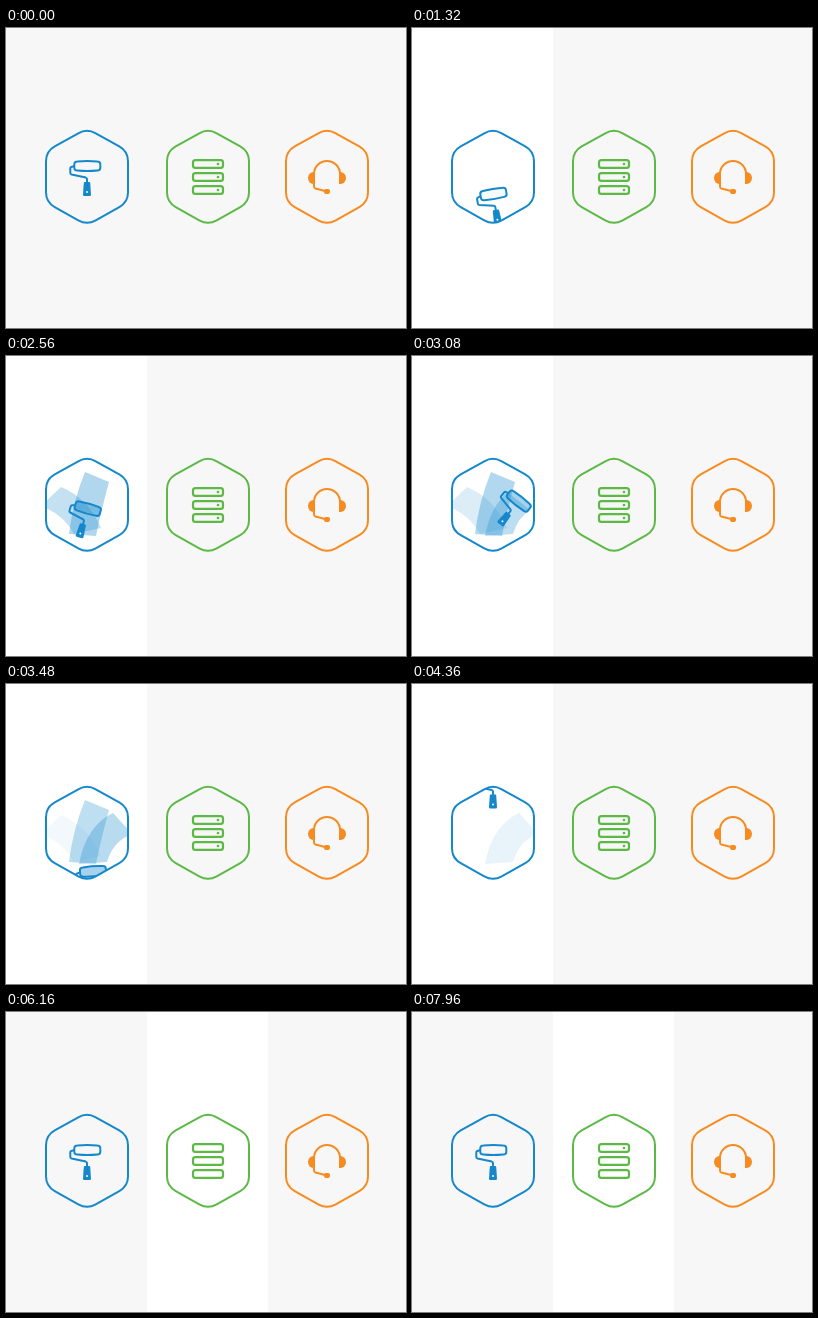
Recreate the animation shown at these times as an HTML page. Size 400x300 px, loop 8000 ms.

```html
<!DOCTYPE html>
<html lang="en">
<head>
<meta charset="utf-8">
<title>Service icons</title>
<style>
html, body { margin: 0; width: 100%; height: 100%; overflow: hidden; background: #f7f7f7; }
svg { display: block; width: 100vw; height: 100vh; }
</style>
</head>
<body>
<svg viewBox="0 0 400 300" fill="none" stroke-width="2" stroke-linejoin="round" stroke-linecap="round">
  <defs>
    <path id="hex"/>
    <clipPath id="inside"><use href="#hex" x="81" y="148.8"/></clipPath>
  </defs>
  <rect id="col1" width="141" height="300" fill="#fff"/>
  <rect id="col2" x="141" width="121" height="300" fill="#fff"/>

  <g stroke="#1588cb">
    <g clip-path="url(#inside)">
      <g id="paints" fill="#1588cb" stroke="none"></g>
      <g id="roller">
        <path id="body" fill="#1588cb" d="M-10 -4.6Q0 -5.6 10 -4.6Q13 -4.4 13 -2V2Q13 4.4 10 4.6Q0 5.6 -10 4.6Q-13 4.4 -13 2V-2Q-13 -4.4 -10 -4.6Z"/>
        <path d="M-13.5 0.2L-16 1Q-17 1.3 -17 2.5V7Q-17 8.2 -15.8 8.5L-1.5 11.6Q-0.3 12 -0.3 13V16"/>
        <path fill="#1588cb" stroke="none" d="M-2.6 16H2Q2.8 16 2.9 17L3.7 28.4Q3.8 30 2.4 30H-3Q-4.4 30 -4.3 28.4L-3.5 17Q-3.4 16 -2.6 16Z"/>
        <circle cx="-0.3" cy="26" r="1" fill="#fff" stroke="none"/>
      </g>
    </g>
    <use href="#hex" x="81" y="148.8"/>
  </g>

  <g stroke="#5cb946">
    <use href="#hex" x="202" y="148.8"/>
    <g id="bars" stroke-width="2.2"></g>
    <g id="lights" fill="#5cb946" stroke="none"></g>
  </g>

  <g stroke="#f68b1f">
    <use href="#hex" x="321" y="148.8"/>
    <path d="M308 156V146A13 13 0 0 1 334 146V150M308 155V158.5Q308 160 309.5 160.5L319 163"/>
    <g fill="#f68b1f" stroke="none">
      <path d="M309 144V156H307.5A5.5 6 0 0 1 307.5 144Z"/>
      <path d="M333 144V156H334.5A5.5 6 0 0 0 334.5 144Z"/>
      <rect x="318" y="161" width="6" height="5" rx="2"/>
    </g>
  </g>
</svg>
<script>
const LOOP = 8000, HOVER1 = 1160, HOVER2 = 5720;
const el = id => document.getElementById(id);
const clamp = x => Math.max(0, Math.min(1, x));
const smooth = x => (1 - Math.cos(Math.PI * clamp(x))) / 2;
const linear = x => clamp(x);
const mix = (a, b, u) => a + (b - a) * u;
const mixPt = (p, q, u) => [mix(p[0], q[0], u), mix(p[1], q[1], u)];

function add(parent, tag, attrs = {}) {
  const node = document.createElementNS('http://www.w3.org/2000/svg', tag);
  for (const k in attrs) node.setAttribute(k, attrs[k]);
  return el(parent).appendChild(node);
}

// keys: [time, value] pairs
function track(keys, t, ease = linear) {
  if (t <= keys[0][0]) return keys[0][1];
  for (let i = 1; i < keys.length; i++) {
    const [a, from] = keys[i - 1], [b, to] = keys[i];
    if (t < b) return mix(from, to, ease((t - a) / (b - a)));
  }
  return keys[keys.length - 1][1];
}

function hexPath() {
  const pts = [[0, -48.4], [41, -25.5], [41, 25.5], [0, 48.4], [-41, 25.5], [-41, -25.5]];
  const toward = (p, q) => mixPt(p, q, 10 / Math.hypot(q[0] - p[0], q[1] - p[1]));
  return pts.map((p, i) => {
    const start = toward(p, pts[(i + 5) % 6]), end = toward(p, pts[(i + 1) % 6]);
    return `${i ? 'L' : 'M'}${start}Q${p} ${end}`;
  }).join('') + 'Z';
}
el('hex').setAttribute('d', hexPath());

// Each stroke sweeps an edge between two curved sides: out, then back.
const strokes = [
  { left: [[68, 178], [57, 158], [35, 150]], right: [[95, 172], [82, 142], [55, 131]],
    start: 1400, top: 1700, end: 2040,
    fade: [[1400, .14], [1840, .18], [2300, .28], [2560, .25], [3080, .15], [3700, 0]] },
  { left: [[63, 178], [67, 145], [79, 116]], right: [[90, 180], [95, 155], [103, 126]],
    start: 2040, top: 2360, end: 2740,
    fade: [[2040, .2], [2480, .34], [3100, .33], [3640, .25], [4280, 0]] },
  { left: [[73, 180], [80, 142], [107, 129]], right: [[101, 178], [107, 157], [126, 150]],
    start: 2740, top: 3240, end: 3460,
    fade: [[2740, .2], [3080, .28], [3560, .3], [4360, .1], [4600, 0]] }
];
for (const s of strokes) s.path = add('paints', 'path');

function split([p, c, q], u) {
  const ctrl = mixPt(p, c, u);
  return [p, ctrl, mixPt(ctrl, mixPt(c, q, u), u)];
}

function paintPath(s, u) {
  const l = split(s.left, u), r = split(s.right, u);
  return `M${l[0]}Q${l[1]} ${l[2]}L${r[2]}Q${r[1]} ${r[0]}Z`;
}

function edgePose(s, u) {
  const a = split(s.left, u)[2], b = split(s.right, u)[2];
  const [x, y] = mixPt(a, b, .5);
  return [x, y, Math.atan2(b[1] - a[1], b[0] - a[0]) * 180 / Math.PI];
}

const HOME = [81.3, 138, 0];
const mixPose = (p, q, u) => p.map((v, i) => mix(v, q[i], u));

function rollerPose(t) {
  if (t < HOVER1 || t >= 5040) return HOME;
  if (t < 1400) return mixPose(HOME, edgePose(strokes[0], 0), smooth((t - HOVER1) / 240));
  for (let i = 0; i < 3; i++) {
    const s = strokes[i];
    if (t >= s.end) continue;
    const u = track([[s.start, 0], [s.top, 1], [s.end, 0]], t, smooth);
    const pose = edgePose(s, u);
    // carry the roller over from where the previous stroke ended
    if (i && t < s.top) {
      const prev = edgePose(strokes[i - 1], 0), base = edgePose(s, 0);
      const k = 1 - smooth((t - s.start) / 160);
      return pose.map((v, j) => v + (prev[j] - base[j]) * k);
    }
    return pose;
  }
  if (t < 4160) {
    const [x, y, tilt] = edgePose(strokes[2], 0);
    return [x, y + 40 * linear((t - 3460) / 100), tilt];
  }
  return [HOME[0], HOME[1] - 68 * (1 - easeCss((t - 4160) / 880)), 0];
}

// cubic-bezier(.25, .1, .25, 1)
function easeCss(x) {
  let lo = 0, hi = 1;
  const bez = (a, b, s) => 3 * a * s * (1 - s) ** 2 + 3 * b * s * s * (1 - s) + s ** 3;
  for (let i = 0; i < 24; i++) {
    const mid = (lo + hi) / 2;
    if (bez(.25, .25, mid) < clamp(x)) lo = mid; else hi = mid;
  }
  return bez(.1, 1, lo);
}

const lights = [0, 1, 2].map(i => {
  add('bars', 'rect', { x: 187, y: 132.1 + 13 * i, width: 30, height: 7.8, rx: 2.4 });
  return add('lights', 'circle', { cx: 212, cy: 136 + 13 * i, r: 1.3 });
});
const blinks = [
  [[6280, 0], [6520, 1], [6800, 1], [7040, 0], [7320, 0], [7560, 1]],
  [[7540, 0], [7740, 1], [7760, 1], [7960, 0]],
  [[0, 0]]
];

function draw(t) {
  el('col1').setAttribute('visibility', t >= HOVER1 && t < HOVER2 ? 'visible' : 'hidden');
  el('col2').setAttribute('visibility', t >= HOVER2 ? 'visible' : 'hidden');

  for (const s of strokes) {
    const u = smooth((t - s.start) / (s.top - s.start));
    s.path.setAttribute('d', paintPath(s, u));
    s.path.setAttribute('opacity', u > 0 ? track(s.fade, t) : 0);
  }
  const [x, y, tilt] = rollerPose(t);
  el('roller').setAttribute('transform', `translate(${x} ${y}) rotate(${tilt})`);
  el('body').setAttribute('fill-opacity',
    track([[1300, 0], [1500, .38], [3600, .38], [3601, 0]], t));

  el('bars').setAttribute('opacity', t < HOVER2 ? 1 : smooth((t - HOVER2 + 40) / 480));
  lights.forEach((light, i) =>
    light.setAttribute('opacity', t < HOVER2 ? 1 : track(blinks[i], t)));
}

const began = performance.now();
function frame() {
  draw((performance.now() - began) % LOOP);
  requestAnimationFrame(frame);
}
draw(0);
requestAnimationFrame(frame);
</script>
</body>
</html>
```
